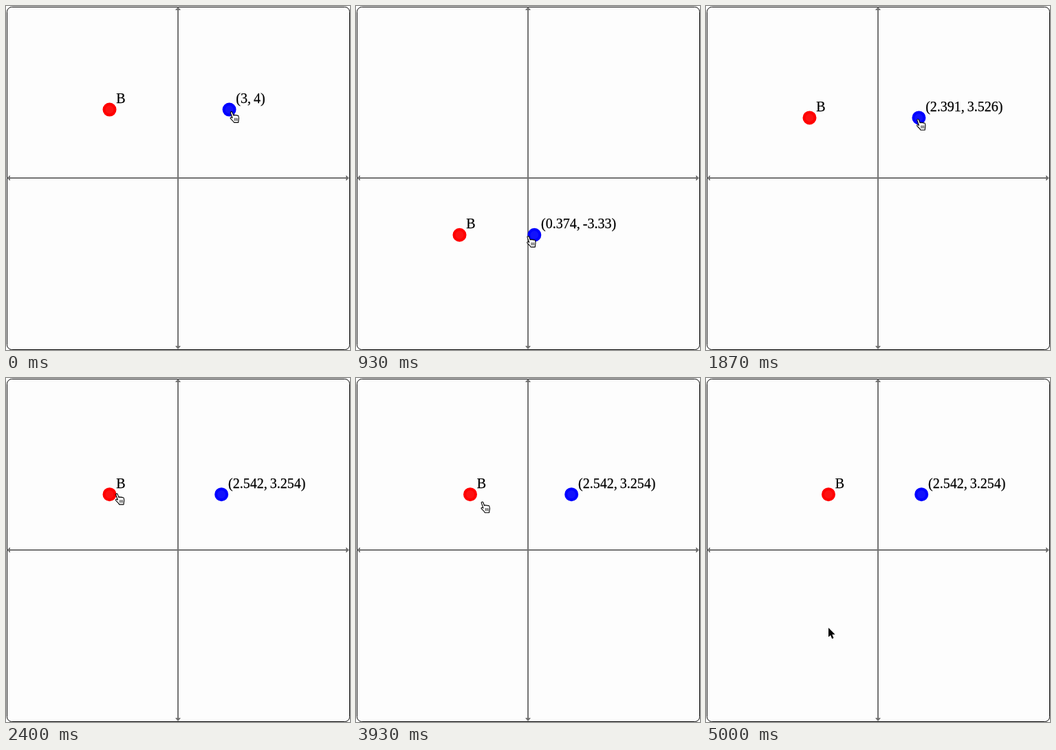
Recreate the animation shown at these times as an HTML page. Size 500 px wide and 500 px high, loop 5070 ms.

```html
<!DOCTYPE html>
<html lang="en">
<head>
<meta charset="utf-8">
<title>Linked points</title>
<style>
  html, body { margin: 0; width: 100%; height: 100%; overflow: hidden; background: #fff; }
  svg { display: block; width: 100vw; height: 100vh; }
  text { font: 20px "Liberation Serif", serif; word-spacing: -1px; stroke: #000; stroke-width: .25; }
  .axis { stroke: #747474; stroke-width: 2; }
  .tip { fill: #747474; }
  circle { stroke-width: 4; }
</style>
</head>
<body>
<svg viewBox="0 0 500 500">
  <rect x="1.5" y="1.5" width="498" height="498" rx="7" fill="#fdfdfd" stroke="#000"/>
  <path class="axis" d="M3 250H497M250 3V497"/>
  <path class="tip" d="M1 250l5-4v8zM499 250l-5-4v8zM250 1l-4 5h8zM250 499l-4-5h8z"/>
  <g id="blue">
    <circle r="8" fill="#1212fc" stroke="#00f"/>
    <text id="coords" x="9.8" y="-9.3"></text>
  </g>
  <g id="red">
    <circle r="8" fill="#fc1212" stroke="#f00"/>
    <text x="9.8" y="-9.3">B</text>
  </g>
  <g id="hand" stroke="#000" stroke-width="1.1" stroke-linejoin="round" stroke-linecap="round">
    <path fill="#fff" d="M1.2 1.6C1.6.2 3.4.2 3.9 1.5L5.6 6C6.2 5 7.6 5 8 6C8.7 5.2 10 5.3 10.4 6.3C11.3 5.6 12.6 6 12.9 7.2C13.6 9.4 13.6 11 13 13L12.6 16.3H6.4C5.6 14.4 3.5 12.6 1.6 10.8C.3 9.5 1.6 8.2 3.1 9L4 9.6Z"/>
    <path fill="none" stroke-width=".8" d="M7.3 10v3.4M9.2 10v3.4M11.1 10v3.4"/>
  </g>
  <path id="arrow" stroke="#fff" paint-order="stroke" d="M0 0V13.5L3 10.7L5.2 16L7.5 15L5.3 9.8H9.6Z"/>
</svg>
<script>
const LOOP = 5070, STEPS = 76, UNIT = 24.85;
const RELEASE = 31, GRAB = 39, LEAD = .25;

// The blue point sweeps clockwise around this ellipse, through a few places.
const orbit = { x: .3, y: 1, rx: 2.9, ry: 4.2 };
const places = [[3, 3, 4], [8, 3.058, 2.216], [20, -2.084, 3.866], [28, 2.391, 3.526], [RELEASE, 2.542, 3.254]];

// The red point is swung from side to side: step, x.
const swings = [[42, 150.5], [47, 147.5], [54, 76], [58, 86], [59, 166], [62, 237], [66, 220], [71, 105], [74, 178]];

// Cursor: its rest offset on the blue point, then its height while it drags the red one.
const grip = [[0, 1, 3], [2, -2, 2], [28, -4, 1]];
const height = [[GRAB, 168], [47, 190], [59, 180], [66, 341], [74, 363]];

const $ = id => document.getElementById(id);
const place = (id, x, y) => $(id).setAttribute("transform", `translate(${x} ${y})`);
const trim = v => String(+v.toFixed(3));

let turn = Infinity;
const sweep = places.map(([step, x, y]) => {
  const u = (x - orbit.x) / orbit.rx, v = (y - orbit.y) / orbit.ry;
  let angle = Math.atan2(v, u);
  while (angle > turn) angle -= 2 * Math.PI;
  turn = angle;
  return [step, angle, Math.hypot(u, v)];
});

// Cubic through the rows; tangents flatten at turning points so nothing overshoots.
function sample(rows, k) {
  const last = rows.length - 1;
  if (k <= rows[0][0]) return rows[0].slice(1);
  if (k >= rows[last][0]) return rows[last].slice(1);
  const i = rows.findIndex(r => r[0] > k) - 1;
  const span = rows[i + 1][0] - rows[i][0], u = (k - rows[i][0]) / span;
  const slope = (n, c) => (rows[n + 1][c] - rows[n][c]) / (rows[n + 1][0] - rows[n][0]);
  const tangent = (n, c) => {
    if (n === 0 || n === last) return 0;
    const a = slope(n - 1, c), b = slope(n, c);
    return a * b <= 0 ? 0 : 2 * a * b / (a + b);
  };
  return rows[i].slice(1).map((from, j) => {
    const c = j + 1, to = rows[i + 1][c];
    return from + (to - from) * u * u * (3 - 2 * u)
      + span * u * (1 - u) * ((1 - u) * tangent(i, c) - u * tangent(i + 1, c));
  });
}

function blueAt(k) {
  const [angle, r] = sample(sweep, k);
  const x = orbit.x + orbit.rx * r * Math.cos(angle);
  const y = orbit.y + orbit.ry * r * Math.sin(angle);
  return { x, y, px: 250 + x * UNIT, py: 250 - y * UNIT };
}
const redAt = k => sample(swings, k)[0];

// A dragging cursor runs ahead of its point in proportion to the speed.
const lead = (pos, k) => LEAD * (pos(k + .5) - pos(k - .5));

function cursorAt(k) {
  const { px, py } = blueAt(k), [dx, dy] = sample(grip, k);
  const onBlue = [px + dx + lead(t => blueAt(t).px, k), py + dy + lead(t => blueAt(t).py, k)];
  const onRed = [redAt(k) + lead(redAt, k), sample(height, k)[0]];
  const u = Math.min(1, Math.max(0, (k - RELEASE) / (GRAB - RELEASE)));
  const ease = 1 - (1 - u) ** 3;
  return onBlue.map((v, i) => v + (onRed[i] - v) * ease);
}

function draw(k) {
  const { x, y, px, py } = blueAt(k), bx = redAt(k), [cx, cy] = cursorAt(k);
  const over = Math.min(Math.hypot(cx - px, cy - py), Math.hypot(cx - bx, cy - py)) < 19;

  place("blue", px, py);
  place("red", bx, py);
  $("coords").textContent = `(${trim(x)}, ${trim(y)})`;
  place("hand", cx - .5, cy - .5);
  place("arrow", cx, cy);
  $("hand").style.display = over ? "" : "none";
  $("arrow").style.display = over ? "none" : "";
}

// Steps run at 15 per second, on a 10 ms grid.
function stepAt(t) {
  let k = Math.min(STEPS - 1, Math.ceil(t * 15 / 1000));
  while (k > 0 && Math.round(k * 20 / 3) * 10 > t) k--;
  return k;
}

let start;
function tick(now) {
  start ??= now;
  draw(stepAt((now - start) % LOOP));
  requestAnimationFrame(tick);
}
draw(0);
requestAnimationFrame(tick);
</script>
</body>
</html>
```
